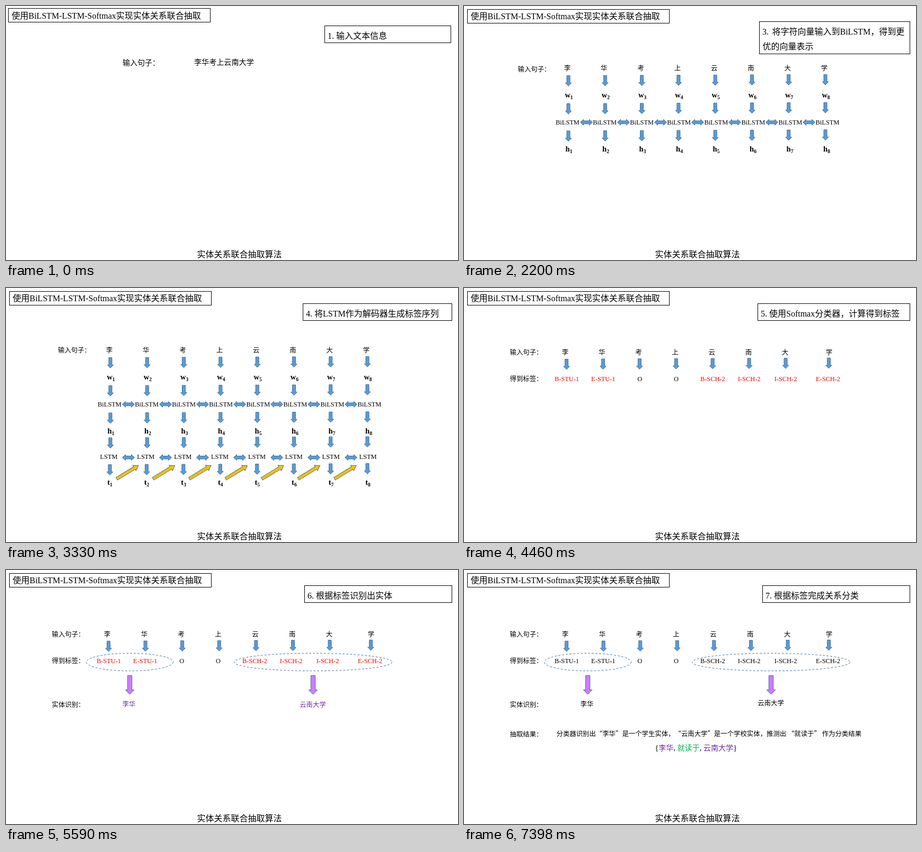
Animation, 853 px wide and 480 px high, one loop 7.85 s. Source, as an HTML page:

```html
<!DOCTYPE html>
<html lang="zh-CN">
<head>
<meta charset="utf-8">
<style>
html, body { margin: 0; width: 100%; height: 100%; overflow: hidden; background: #fff; }
svg { display: block; font: 12.4px 'Liberation Serif', 'Noto Sans CJK SC', serif; }
text { white-space: pre; }
.mid { text-anchor: middle; }
.vec { text-anchor: middle; font-weight: bold; font-size: 14.5px; }
.wide { font-family: 'Noto Sans CJK SC', sans-serif; text-spacing-trim: space-all; }
</style>
</head>
<body>
<svg id="stage" width="853" height="480" viewBox="0 0 853 480"></svg>
<script>
const BLUE = '#5b9bd5', EDGE = '#41719c', ORANGE = '#ffc000', VIOLET = '#cc7cff';
const BLACK = '#000', PURPLE = '#7030a0', GREEN = '#00b050', RED = '#ff0000';
const SENTENCE = [...'李华考上云南大学'];
const TAGS = 'B-STU-1 E-STU-1 O O B-SCH-2 I-SCH-2 I-SCH-2 E-SCH-2'.split(' ');

const text = (x, y, str, attrs = '') => `<text x="${x}" y="${y}" ${attrs}>${str}</text>`;
const big = (x, y, str) => text(x, y, str, 'font-size="16"');
const mid = (x, y, str, fill = BLACK) => text(x, y, str, `class="mid" fill="${fill}"`);
const span = (str, fill) => `<tspan fill="${fill}">${str}</tspan>`;
const box = (l, t, r, b) =>
  `<rect x="${l + .5}" y="${t + .5}" width="${r - l - 1}" height="${b - t - 1}" fill="none" stroke="#000"/>`;
const ellipse = (x, rx) =>
  `<ellipse cx="${x}" cy="174" rx="${rx}" ry="16.7" fill="none" stroke="${EDGE}" stroke-dasharray="4 3"/>`;
const polygon = (points, fill, transform) =>
  `<polygon points="${points}" fill="${fill}" stroke="${EDGE}" transform="${transform}"/>`;

// Block arrow between two points; s and h are half widths of shaft and head.
function arrow(x1, y1, x2, y2, fill = BLUE, s = 3, h = 5.8, head = 6) {
  const len = Math.hypot(x2 - x1, y2 - y1), neck = len - head;
  const angle = Math.atan2(y2 - y1, x2 - x1) * 180 / Math.PI;
  return polygon(`0,${-s} ${neck},${-s} ${neck},${-h} ${len},0 ${neck},${h} ${neck},${s} 0,${s}`,
    fill, `translate(${x1} ${y1}) rotate(${angle})`);
}
const doubleArrow = (x, y) =>
  polygon('-11.5,0 -5.5,-5.5 -5.5,-2.8 5.5,-2.8 5.5,-5.5 11.5,0 5.5,5.5 5.5,2.8 -5.5,2.8 -5.5,5.5',
    BLUE, `translate(${x} ${y})`);

// Evenly spaced columns, and rows of items drawn on them.
const spread = (first, last, n = 8) =>
  Array.from({ length: n }, (_, i) => first + (last - first) * i / (n - 1));
const row = (xs, draw) => xs.map(draw).join('');
const chars = (xs, y) => row(xs, (x, i) => mid(x, y, SENTENCE[i]));
const words = (xs, y, word) => row(xs, x => mid(x, y, word));
const links = y => row(spread(231, 651, 7), x => doubleArrow(x, y));
const vectors = (xs, y, letter) => row(xs, (x, i) =>
  text(x, y, `${letter}<tspan dy="3" font-size="9.5">${i + 1}</tspan>`, 'class="vec"'));
// Rows of down arrows climb slightly to the right.
const downs = (xs, y) => row(xs, (x, i) => arrow(x, y - .3 * i, x, y - .3 * i + 19.7));

const frame = (d = 2) => box(4 + d, 4 + d, 386 + d, 31 + d) +
  big(10.5 + d, 24 + d / 2, '使用BiLSTM-LSTM-Softmax实现实体关系联合抽取') +
  big(360.5, 475, '实体关系联合抽取算法');
const step = (left, str) => frame() + box(left, 29, 842, 62) + big(left + 6, 54, str);
const longStep = (left, number, first, second) => frame() + box(left, 29, 842, 91) +
  big(left + 6, 54, number) + big(left + 24.5, 54, first) + big(left + 6.5, 82, second);

const arrowColumns = spread(197, 682);
const encoder = (labelX, labelY) =>
  text(labelX, labelY, '输入句子：') + chars(spread(195, 680), 122) +
  downs(arrowColumns, 131.5) + vectors(spread(198, 683), 173, 'w') +
  downs(arrowColumns, 184.5) + words(spread(195.5, 686), 223.5, 'BiLSTM') + links(219.8) +
  downs(arrowColumns, 236) + vectors(spread(198, 684.5), 275, 'h');

const decoder = () =>
  downs(arrowColumns, 283) + words(spread(194, 683), 323, 'LSTM') + links(320.3) +
  downs(spread(196, 682), 333.8) + vectors(spread(196, 683), 372, 't') +
  row(spread(209, 620, 7), x => arrow(x, 360.5, x + 41, 335.5, ORANGE, 2.8, 6, 9));

// The final column stands a little apart from the other seven.
const tags = (color, seventh) =>
  text(86.5, 126, '输入句子：') + chars([...spread(191, seventh, 7), 689], 126) +
  downs([...spread(193.5, seventh + 1, 7), 688.5], 134.3) +
  text(86.5, 176, '得到标签：') +
  row([...spread(194, 607, 7), 687], (x, i) => mid(x, 176, TAGS[i], TAGS[i] === 'O' ? BLACK : color));

const entities = (color, schoolY) =>
  ellipse(233.5, 82) + ellipse(579.5, 149) +
  row([233.5, 579.5], x => arrow(x, 199.5, x, 235, VIOLET, 4.2, 8.3, 8.5)) +
  text(86.5, 259, '实体识别：') + mid(232, 258, '李华', color) + mid(579, schoolY, '云南大学', color);

const result = () => text(86.5, 315, '抽取结果：') +
  text(174.5, 314, '分类器识别出“李华”是一个学生实体，“云南大学”是一个学校实体，推测出 “就读于” 作为分类结果',
    'class="wide"') +
  text(360.5, 341, `{${span('李华', PURPLE)}, ${span('就读于', GREEN)}, ${span('云南大学', PURPLE)}}`,
    'font-size="14.1"');

const scenes = [
  frame(0) + box(601, 37, 840, 70) + big(607, 62, '1. 输入文本信息') +
    text(220, 112, '输入句子：', 'font-size="14"') +
    text(355, 111, SENTENCE.join(''), 'font-size="14.1"'),

  longStep(551, '2.', '利用Word2Vec获取句子中字符的基础', '向量表示') +
    text(122.5, 132, '输入句子：') + chars(spread(203, 682), 132) +
    downs(spread(204.5, 683), 140.5) + vectors(spread(204, 686), 183, 'w'),

  longStep(557, '3.', '将字符向量输入到BiLSTM，得到更', '优的向量表示') + encoder(101.5, 124),

  step(560, '4. 将LSTM作为解码器生成标签序列') + encoder(98, 122) + decoder(),

  step(554, '5. 使用Softmax分类器，计算得到标签') + tags(RED, 606),

  step(563, '6. 根据标签识别出实体') + tags(RED, 610) + entities(PURPLE, 259),

  step(563, '7. 根据标签完成关系分类') + tags(BLACK, 610) + entities(BLACK, 256) + result()
];

const stage = document.getElementById('stage');
const FIRST = 1070, EACH = 1130, LOOP = 7850;
let shown = -1;
function tick() {
  const t = performance.now() % LOOP;
  const scene = t < FIRST ? 0 : 1 + Math.floor((t - FIRST) / EACH);
  if (scene !== shown) stage.innerHTML = scenes[shown = scene];
  requestAnimationFrame(tick);
}
tick();
</script>
</body>
</html>
```
